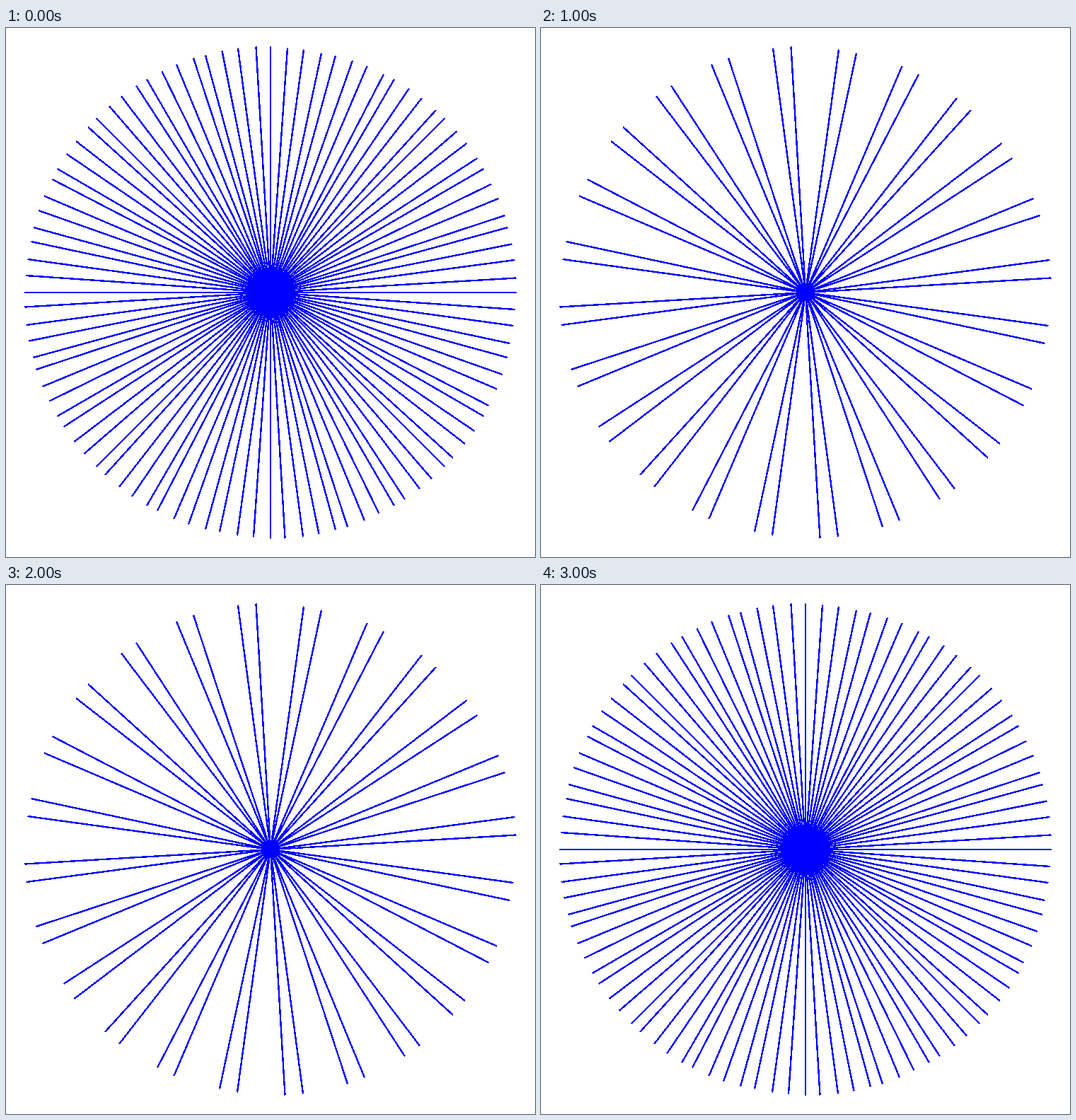
Write an HTML page that moves like this. It is 748 by 748 pixels and loops after 3500 ms.

```html
<!DOCTYPE html>
<html lang="en">
<head>
<meta charset="utf-8">
<title>Radial lines</title>
<style>
  html, body { margin: 0; width: 100%; height: 100%; overflow: hidden; background: #fff; }
  svg { display: block; width: 748px; height: 748px; }
  path { fill: none; stroke: #00f; stroke-width: 2.4; shape-rendering: crispEdges; }
</style>
</head>
<body>
<svg viewBox="0 0 748 748"></svg>
<script>
const CENTER = 374;
const STEP = 500;
const STEPS = 7;

// Ray tips of one quadrant, clockwise from the top: [right, up] from the centre.
const tips = [
  [24, 346], [47, 343.5], [72, 338.5], [92, 335], [116, 328], [136.5, 320],
  [160, 308.5], [175, 301.5], [196, 288.5], [214, 275], [234, 258], [246.5, 246.5],
  [263.5, 228], [277.5, 211], [292.5, 190], [301.5, 175], [312.5, 153.5], [322.5, 133],
  [331.5, 109], [335.5, 92], [341.5, 68.5], [345.5, 46], [347.5, 20.5], [348, 0]
];

// Level at which each ray of a group of four appears.
const levels = [4, 2, 1, 3];
const outlines = ["", "", "", ""];

tips.forEach(([x, y], i) => {
  for (let turn = 0; turn < 4; turn++) {
    outlines[levels[i % 4] - 1] += `M${CENTER} ${CENTER}L${CENTER + x} ${CENTER - y}`;
    [x, y] = [y, -x];
  }
});

const svg = document.querySelector("svg");
const groups = outlines.map(d => {
  const path = document.createElementNS("http://www.w3.org/2000/svg", "path");
  path.setAttribute("d", d);
  return svg.appendChild(path);
});

function draw(time) {
  const step = Math.floor(time / STEP) % STEPS;
  const level = Math.abs(3 - step) + 1;
  groups.forEach((path, i) => {
    path.style.display = i < level ? "" : "none";
  });
}

let start;
function tick(now) {
  start ??= now;
  draw(now - start);
  requestAnimationFrame(tick);
}

draw(0);
requestAnimationFrame(tick);
</script>
</body>
</html>
```
